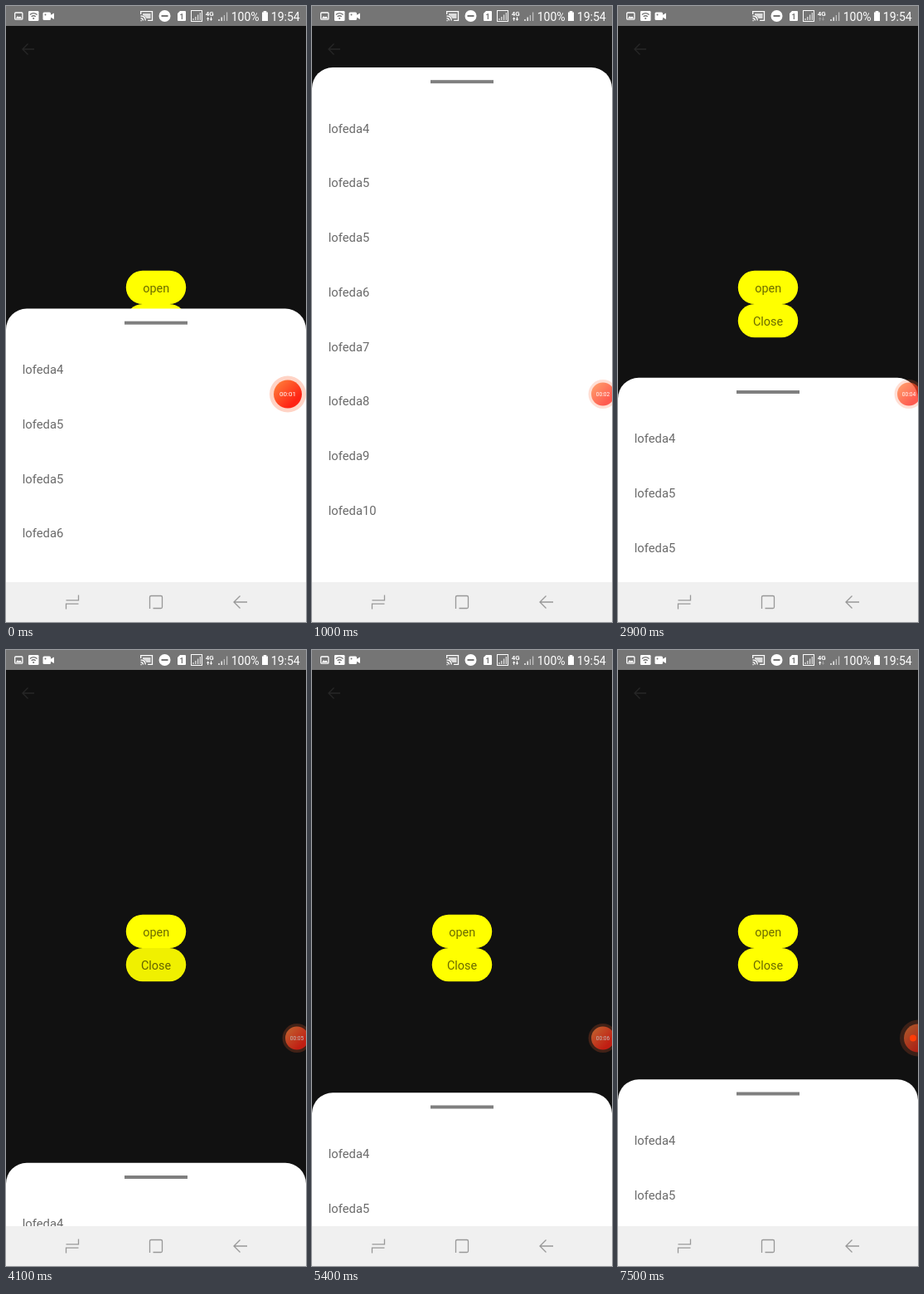
Recreate the animation shown at these times as an HTML page. Size 362x742 px, loop 8000 ms.

```html
<!DOCTYPE html>
<html lang="en">
<head>
<meta charset="utf-8">
<title>Bottom sheet</title>
<style>
  html, body { margin: 0; width: 100%; height: 100%; overflow: hidden; background: #111; }
  svg { display: block; width: 100vw; height: 100vh; font-family: Roboto, "Noto Sans", sans-serif; }
  .label { font-size: 14.8px; fill: #000; fill-opacity: .59; }
  .button { font-size: 14.4px; }
  .mid { text-anchor: middle; }
  .line { fill: none; stroke-width: 1.3; }
</style>
</head>
<body>
<svg viewBox="0 0 362 742">
  <defs>
    <linearGradient id="hot" x1="0" y1="0" x2="1" y2="1">
      <stop offset=".1" stop-color="#ff7a38"/>
      <stop offset=".75" stop-color="#ff2314"/>
    </linearGradient>
  </defs>

  <rect width="362" height="742" fill="#111"/>
  <path class="line" d="M34 52H20M26.5 45.5L20 52L26.5 58.5" stroke="#272727"/>

  <rect id="open" x="144.8" y="318.8" width="72.4" height="40.2" rx="20"/>
  <rect id="close" x="144.8" y="359" width="72.4" height="40.2" rx="20"/>
  <text class="label button mid" x="181.2" y="344.7">open</text>
  <text class="label button mid" x="181" y="384.7">Close</text>

  <g id="sheet">
    <path d="M0 720V25A25 25 0 0 1 25 0H337A25 25 0 0 1 362 25V720Z" fill="#fff"/>
    <rect x="143" y="15.2" width="76" height="4" fill="#7f7f7f"/>
    <g id="list"></g>
  </g>

  <g id="nav">
    <rect y="694" width="362" height="48" fill="#f0f0f0"/>
    <g class="line" stroke="#989898">
      <path d="M72.5 715.8H87.5V709.5M87.5 720.2H72.5V726.5"/>
      <path d="M173.5 726V712Q173.5 710.5 175 710.5H187Q188.5 710.5 188.5 712V724Q188.5 725.5 187 725.5H177.5"/>
      <path d="M291 718H275.5M282.5 710.5L275 718L282.5 725.5"/>
    </g>
  </g>

  <g id="timer">
    <circle id="ring" cy="467.5" fill="#ff6432" fill-opacity=".28"/>
    <circle id="core" cy="467.5" fill="url(#hot)"/>
    <text id="count" class="mid" fill="#fff"></text>
  </g>
  <circle id="dot" cx="356" cy="467.5" r="4" fill="#ff3d08"/>

  <g id="status">
    <rect width="362" height="24" fill="#757575"/>
    <g fill="#fff">
      <path d="M12 15L14 12L15.7 13.7L17 12.3L19 15Z"/>
      <rect x="27" y="6" width="12.5" height="12" rx="1.3"/>
      <rect x="44.5" y="7.5" width="9.5" height="9.5" rx="1.5"/>
      <path d="M53.5 11L58 8.5V16L53.5 13.5Z"/>
      <circle cx="191.5" cy="12" r="7"/>
      <path d="M207 9L210 6H216Q217 6 217 7V17Q217 18 216 18H208Q207 18 207 17Z"/>
      <path d="M309 7.5H310.7V6H314.3V7.5H316V18H309Z"/>
    </g>
    <g fill="#757575">
      <rect x="187.5" y="11" width="8" height="2"/>
      <circle cx="47.5" cy="10.5" r="1"/>
      <circle cx="33.2" cy="15" r="1.1"/>
      <text class="mid" x="212" y="15.5" font-size="9" font-weight="700">1</text>
    </g>
    <path class="line" d="M28.8 10.5Q33.2 6.7 37.6 10.5M30.6 12.8Q33.2 10.7 35.8 12.8" stroke="#757575"/>
    <g class="line" stroke="#fff">
      <rect x="10.7" y="8" width="9.2" height="8.2" rx="1"/>
      <path d="M162.7 10V6.7H176.5V17.3H171M162.5 17.5h1.2M162.5 14.7Q165.4 14.7 165.4 17.6M162.5 12Q168.2 12 168.2 17.6"/>
      <rect x="223.5" y="5.5" width="13" height="13" stroke-width="1"/>
      <path d="M226 17V15M228.8 17V13M231.6 17V10.5M234.4 17V8" stroke-opacity=".75"/>
      <path d="M257 18V16M260.2 18V13.5"/>
      <path d="M263.4 18V11M266.6 18V7.5" stroke-opacity=".55"/>
    </g>
    <path d="M165 9H174.5V15H169.5Q168 12 165 11Z" fill="#fff" fill-opacity=".75"/>
    <g fill="#fff">
      <text x="240.7" y="12" font-size="8" font-weight="700">4G</text>
      <path id="up" d="M242 15.8L243.7 13.2L245.4 15.8H244.2V18H243.2V15.8Z"/>
      <path id="down" d="M245.8 15.4H247V13.2H248V15.4H249.2L247.5 18Z"/>
      <text x="271.7" y="17.5" font-size="14">100%</text>
      <text x="319.8" y="17.5" font-size="14">19:54</text>
    </g>
  </g>
</svg>
<script>
const LOOP = 8000, STEP = 100;
const $ = id => document.getElementById(id);
const set = (id, attrs) => {
  for (const key in attrs) $(id).setAttribute(key, attrs[key]);
};
const clamp = x => Math.max(0, Math.min(1, x));
const mix = (a, b, k) => a + (b - a) * k;

// [time, sheet top]
const path = [
  [0, 364.5], [100, 358], [200, 335], [300, 282], [400, 198], [500, 113.8],
  [600, 84], [700, 74], [1700, 74], [1800, 230.5], [1900, 385], [2000, 447.8],
  [3900, 447.8], [4000, 525], [4100, 617.8], [4200, 675], [4300, 700],
  [5000, 700], [5100, 666], [5200, 601], [5300, 556], [5400, 533.3]
];

function sheetTop(t) {
  if (t >= 6200) return 517.3;
  if (t >= 5400) return 517.3 + 16 * Math.exp(-(t - 5400) / 190);
  const i = path.findIndex(p => p[0] > t);
  const [t0, y0] = path[i - 1], [t1, y1] = path[i];
  return mix(y0, y1, (t - t0) / (t1 - t0));
}

const ticks = [1000, 1900, 2900, 3900, 4900, 5800];

function drawTimer(t) {
  const docked = t >= 1000;
  const hide = clamp((t - 5700) / 500);
  const x = docked ? mix(351, 362, hide) : 340;
  const seconds = 1 + ticks.filter(k => t >= k).length;
  set("ring", { cx: x, r: docked ? mix(17.5, 22, hide) : 22 });
  set("core", { cx: x, r: docked ? mix(14, 17, hide) : 17 });
  set("timer", { opacity: docked ? mix(.74, .65, hide) : 1 });
  set("count", {
    x, y: docked ? 469.8 : 470.3,
    "font-size": docked ? 6.6 : 8,
    opacity: clamp(1 - hide * 2)
  });
  $("count").textContent = "00:0" + seconds;
  set("dot", { opacity: clamp(hide * 2 - 1) });
}

function draw(time) {
  const t = Math.floor((time % LOOP) / STEP) * STEP;
  const button = (from, to) => ({ fill: t >= from && t < to ? "#f0f000" : "#ff0" });
  set("sheet", { transform: `translate(0 ${sheetTop(t)})` });
  set("open", button(4900, 5300));
  set("close", button(3800, 4300));
  const idle = t >= 2500 && t < 3500;
  set("up", { opacity: idle ? .3 : 1 });
  set("down", { opacity: idle || t >= 7500 ? .3 : 1 });
  drawTimer(t);
}

[4, 5, 5, 6, 7, 8, 9, 10].forEach((n, i) => {
  const item = document.createElementNS("http://www.w3.org/2000/svg", "text");
  item.setAttribute("class", "label");
  item.setAttribute("x", 19.7);
  item.setAttribute("y", 78.7 + i * 65.7);
  item.textContent = "lofeda" + n;
  $("list").append(item);
});

const start = performance.now();
function tick() {
  draw(performance.now() - start);
  requestAnimationFrame(tick);
}
tick();
</script>
</body>
</html>
```
